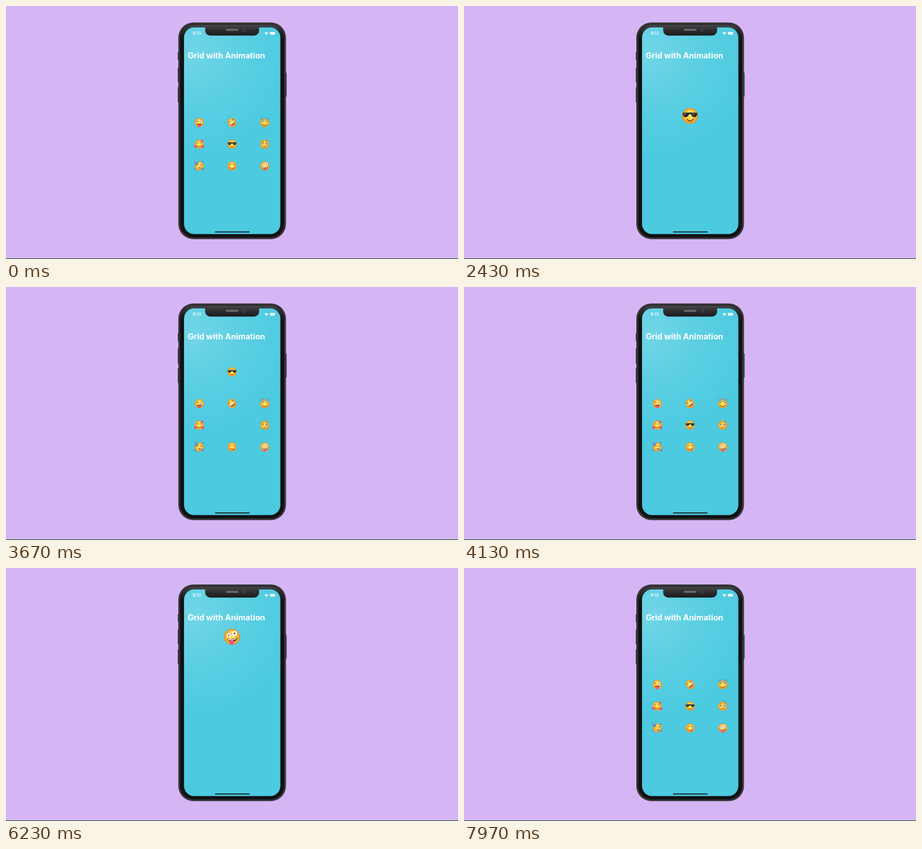
These frames come from a looping animation (800x449 px, 8000 ms). An HTML page with a canvas:

```html
<!DOCTYPE html>
<html lang="en">
<head>
<meta charset="utf-8">
<title>Grid with Animation</title>
<style>
html, body { margin: 0; width: 100%; height: 100%; overflow: hidden; background: #d6b5f5; }
canvas { display: block; width: 800px; height: 449px; }
</style>
</head>
<body>
<canvas id="stage" width="800" height="449"></canvas>
<script>
const ctx = document.getElementById('stage').getContext('2d');
const LOOP = 8000, MOVE = 720, TAU = Math.PI * 2;
const COLS = [342, 400, 458], ROWS = [207, 245.3, 284];
const SMALL = 8.2, BIG = 14;
const TOP = { x: 400, y: 122 };
const INK = '#6b3d12', RED = '#e8486a';

// Each visit lifts one face out of the grid and later returns it.
const visits = [
  { face: 4, open: 2110, close: 3430 },
  { face: 8, open: 5085, close: 6612 }
];

// ---- drawing helpers ----
function box(x, y, w, h, r, fill) {
  ctx.beginPath();
  ctx.roundRect(x, y, w, h, r);
  ctx.fillStyle = fill;
  ctx.fill();
}

function oval(x, y, rx, ry, fill, turn = 0) {
  ctx.beginPath();
  ctx.ellipse(x, y, rx, ry, turn, 0, TAU);
  ctx.fillStyle = fill;
  ctx.fill();
}

function arc(x, y, r, from, to, color = INK, width = 0.11) {
  ctx.beginPath();
  ctx.arc(x, y, r, from * Math.PI, to * Math.PI);
  ctx.strokeStyle = color;
  ctx.lineWidth = width;
  ctx.lineCap = 'round';
  ctx.stroke();
}

function shape(points, fill) {
  ctx.beginPath();
  points.forEach(([x, y]) => ctx.lineTo(x, y));
  ctx.closePath();
  ctx.fillStyle = fill;
  ctx.fill();
}

function fade(gradient, ...colors) {
  colors.forEach((c, i) => gradient.addColorStop(i / (colors.length - 1), c));
  return gradient;
}

// ---- face parts, in units of the head radius ----
function head() {
  const g = ctx.createRadialGradient(0, -0.25, 0.1, 0, 0, 1);
  oval(0, 0, 1, 1, fade(g, '#ffea78', '#fee062', '#fcd04a', '#f6b133', '#e08d22'));
}

const smile = (y = 0.05, r = 0.55) => arc(0, y, r, 0.15, 0.85);
const happyEye = (x, y = -0.12) => arc(x, y, 0.2, 1.1, 1.9);

function openMouth(y, r) {
  ctx.beginPath();
  ctx.arc(0, y, r, 0, Math.PI);
  ctx.closePath();
  ctx.fillStyle = INK;
  ctx.fill();
}

function tongue(x, y, w, h) {
  oval(x, y, w, h, '#f0588d');
  ctx.fillStyle = '#d2407a';
  ctx.fillRect(x - 0.03, y - h * 0.6, 0.06, h);
}

function wideEye(x, y, r, pupil) {
  oval(x, y, r + 0.05, r + 0.05, '#d99a2c');
  oval(x, y, r, r, '#fff');
  oval(x, y, pupil, pupil, INK);
}

function heart(x, y, s) {
  ctx.beginPath();
  ctx.moveTo(x, y + s);
  ctx.bezierCurveTo(x - s * 1.7, y, x - s, y - s * 1.3, x, y - s * 0.4);
  ctx.bezierCurveTo(x + s, y - s * 1.3, x + s * 1.7, y, x, y + s);
  ctx.fillStyle = RED;
  ctx.fill();
}

function blush() {
  oval(-0.6, 0.2, 0.24, 0.18, '#f58a5080');
  oval(0.6, 0.2, 0.24, 0.18, '#f58a5080');
}

const faces = [
  function wink() {
    head();
    arc(-0.4, -0.12, 0.22, 1.1, 1.9);
    wideEye(0.4, -0.2, 0.27, 0.12);
    openMouth(0.24, 0.46);
    tongue(0, 0.66, 0.29, 0.36);
  },
  function laugh() {
    ctx.rotate(-0.6);
    head();
    arc(-0.42, -0.3, 0.2, 1.1, 1.9);
    arc(0.42, -0.3, 0.2, 1.1, 1.9);
    openMouth(0.05, 0.58);
    box(-0.5, 0.07, 1, 0.2, 0.06, '#fff');
    oval(0, 0.5, 0.3, 0.12, '#ee5564');
    oval(-0.84, 0, 0.14, 0.24, '#6bbde6', 0.6);
    oval(0.84, 0, 0.14, 0.24, '#6bbde6', -0.6);
  },
  function angel() {
    head();
    happyEye(-0.38);
    happyEye(0.38);
    smile(0.1);
    ctx.beginPath();
    ctx.ellipse(0, -0.78, 0.94, 0.22, 0, 0, TAU);
    ctx.lineWidth = 0.14;
    ctx.strokeStyle = '#3b9de0';
    ctx.stroke();
  },
  function loved() {
    head();
    blush();
    happyEye(-0.36, -0.15);
    happyEye(0.36, -0.15);
    smile(0.06, 0.48);
    heart(0.62, -0.72, 0.28);
    heart(-0.78, 0.52, 0.3);
    heart(0.78, 0.55, 0.3);
  },
  function cool() {
    head();
    ctx.beginPath();
    ctx.moveTo(-0.96, -0.38);
    ctx.quadraticCurveTo(0, -0.5, 0.96, -0.38);
    ctx.lineTo(0.9, -0.2);
    ctx.bezierCurveTo(0.86, 0.3, 0.24, 0.26, 0.14, -0.18);
    ctx.quadraticCurveTo(0, -0.28, -0.14, -0.18);
    ctx.bezierCurveTo(-0.24, 0.26, -0.86, 0.3, -0.9, -0.2);
    ctx.closePath();
    ctx.fillStyle = '#2b2722';
    ctx.fill();
    shape([[-0.75, -0.3], [-0.48, -0.33], [-0.68, 0]], '#77777a');
    shape([[0.3, -0.33], [0.57, -0.32], [0.37, 0]], '#77777a');
    arc(0.02, 0.2, 0.44, 0.14, 0.82);
  },
  function monocle() {
    head();
    oval(-0.38, -0.14, 0.1, 0.15, INK);
    arc(-0.4, -0.25, 0.3, 1.2, 1.75, INK, 0.09);
    oval(0.38, -0.12, 0.32, 0.32, '#f4ead0');
    arc(0.38, -0.12, 0.32, 0, 2, '#98805c', 0.09);
    oval(0.38, -0.12, 0.11, 0.15, INK);
    arc(0.4, -0.45, 0.32, 1.2, 1.8, INK, 0.09);
    arc(0, 0.82, 0.36, 1.25, 1.75);
    arc(0.55, 0.45, 0.24, 1.7, 2.5, '#98805c', 0.07);
  },
  function party() {
    head();
    happyEye(-0.28, -0.1);
    happyEye(0.42, -0.1);
    blush();
    shape([[-1, -1.05], [-0.82, -0.1], [-0.1, -0.74]], '#4774ce');
    shape([[-0.94, -0.72], [-0.9, -0.5], [-0.36, -0.82], [-0.6, -0.92]], '#63c7ef');
    oval(-0.98, -1, 0.13, 0.13, '#e65aa0');
    oval(0.1, 0.4, 0.18, 0.14, INK);
    shape([[0.1, 0.33], [0.92, 0.62], [0.85, 0.82], [0.08, 0.48]], '#4c8ee0');
    oval(0.9, 0.72, 0.13, 0.13, '#ca4d86');
    oval(0.78, -0.86, 0.12, 0.18, '#3f7ed6', 0.5);
    oval(-0.92, 0.66, 0.11, 0.16, '#4d79cc', 0.3);
  },
  function yum() {
    head();
    blush();
    happyEye(-0.38, -0.18);
    happyEye(0.38, -0.18);
    smile(0.02, 0.56);
    oval(0.3, 0.56, 0.22, 0.16, '#ee4f72', -0.5);
  },
  function zany() {
    ctx.rotate(0.08);
    head();
    wideEye(-0.42, -0.14, 0.25, 0.09);
    wideEye(0.28, -0.44, 0.33, 0.12);
    ctx.beginPath();
    ctx.moveTo(-0.6, 0.28);
    ctx.quadraticCurveTo(0.05, 0.4, 0.7, 0.04);
    ctx.bezierCurveTo(0.7, 0.72, -0.3, 0.86, -0.6, 0.28);
    ctx.fillStyle = INK;
    ctx.fill();
    shape([[-0.5, 0.32], [0.1, 0.34], [0.62, 0.12], [0.56, 0.25], [0.1, 0.44], [-0.42, 0.42]], '#fff');
    tongue(0, 0.72, 0.28, 0.32);
  }
];

function face(i, x, y, r) {
  ctx.save();
  ctx.translate(x, y);
  ctx.scale(r, r);
  faces[i]();
  ctx.restore();
}

// ---- phone ----
function phone() {
  const edge = '#3a393d';
  [82, 109, 144].forEach((y, i) => box(304, y, 3, i ? 27 : 14, 1, edge));
  box(493.6, 118, 3, 43, 1, edge);
  box(305, 29.2, 190.5, 384.6, 27, '#323234');
  box(306.2, 30.4, 188.1, 382.2, 26, '#3e3e41');
  box(307.6, 31.8, 185.3, 379.4, 25, '#1c1c1e');

  // light falls on the glass from above
  const glass = fade(ctx.createLinearGradient(0, 32, 0, 62), '#48484a', '#303032', '#1b1b1d', '#111113');
  box(309, 33, 182.5, 377.4, 23, glass);

  const screen = [315.1, 38, 170.5, 366.8, 18];
  box(...screen, '#4bcae0');
  const glow = ctx.createRadialGradient(330, 85, 10, 330, 85, 185);
  box(...screen, fade(glow, 'rgba(255,255,255,0.2)', 'rgba(255,255,255,0.08)', 'rgba(255,255,255,0)'));

  box(352.5, 36, 95.5, 16.4, [0, 0, 9, 9], glass);
  box(389, 40.6, 22.5, 3.4, 1.7, '#69696b');
  oval(421.4, 42.4, 3.2, 3.2, '#46474e');
  oval(421.4, 42.4, 1.5, 1.5, '#1c2438');
  box(369.8, 399.9, 61.5, 2.1, 1, '#163036');
}

function labels() {
  ctx.fillStyle = '#fff';
  ctx.textBaseline = 'alphabetic';
  ctx.font = '600 7.2px Inter, sans-serif';
  ctx.fillText('9:13', 330.6, 51.2);
  ctx.font = '700 14.2px Inter, sans-serif';
  ctx.fillText('Grid with Animation', 321.7, 93.3);

  arc(461, 51, 4, 1.27, 1.73, '#fff', 1.2);
  arc(461, 51, 2.2, 1.27, 1.73, '#fff', 1.2);
  oval(461, 50.6, 0.8, 0.8, '#fff');
  box(467.3, 46, 8.6, 4.8, 1.4, '#fff');
  box(476.3, 47.5, 0.8, 1.8, 0.4, '#ffffffaa');
}

// ---- motion ----
function ease(p) {
  // cubic-bezier(.42, 0, .58, 1)
  p = Math.min(1, Math.max(0, p));
  let lo = 0, hi = 1, u = p;
  for (let i = 0; i < 20; i++) {
    const x = 1.26 * u * (1 - u) ** 2 + 1.74 * u * u * (1 - u) + u ** 3;
    if (x < p) lo = u; else hi = u;
    u = (lo + hi) / 2;
  }
  return u * u * (3 - 2 * u);
}

const home = i => ({ x: COLS[i % 3], y: ROWS[Math.floor(i / 3)] });

function between(a, b, p) {
  return [a.x + (b.x - a.x) * p, a.y + (b.y - a.y) * p];
}

function emojis(t) {
  const v = visits.find(v => t >= v.open && t < v.close + MOVE);
  if (v && t < v.close) {
    face(v.face, ...between(home(v.face), TOP, ease((t - v.open) / MOVE)), BIG);
    return;
  }
  faces.forEach((_, i) => {
    if (!v || i !== v.face) face(i, home(i).x, home(i).y, SMALL);
  });
  if (v) face(v.face, ...between(TOP, home(v.face), ease((t - v.close) / MOVE)), SMALL);
}

function draw(now) {
  ctx.fillStyle = '#d6b5f5';
  ctx.fillRect(0, 0, 800, 449);
  ctx.fillStyle = '#0a4d12';
  ctx.fillRect(0, 448, 800, 1);
  phone();
  labels();
  emojis(now % LOOP);
  requestAnimationFrame(draw);
}
requestAnimationFrame(draw);
</script>
</body>
</html>
```
